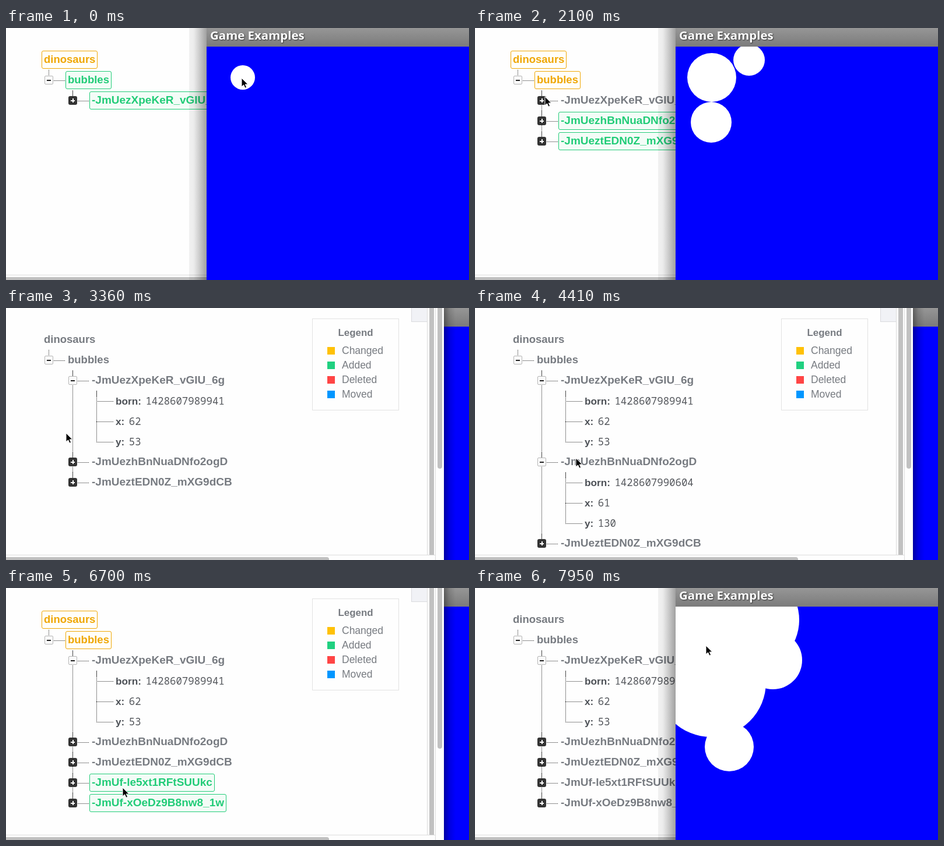
Recreate the animation shown at these times as an HTML page. Size 794 px wide and 433 px high, loop 8 s.

```html
<!DOCTYPE html>
<html lang="en">
<head>
<meta charset="utf-8">
<title>Live data tree and bubbles</title>
<style>
  html, body { margin: 0; width: 100%; height: 100%; overflow: hidden; background: #fefefe; }
  #stage { position: relative; width: 794px; height: 433px; overflow: hidden;
    font-family: "Liberation Sans", Arial, sans-serif; color: #777b81; }
  #stage div, #stage span, #stage svg { position: absolute; box-sizing: border-box; white-space: nowrap; }

  #browser { left: 0; top: 0; width: 751px; height: 433px; background: #fefefe; z-index: 1; }
  #browser .shade { left: 751px; top: 0; width: 20px; height: 433px;
    background: linear-gradient(90deg, rgba(0,0,0,.36), rgba(0,0,0,.13) 45%, transparent); }
  #tree { left: 0; top: 0; width: 722px; height: 424px; overflow: hidden; }
  .thumb { background: #c1c1c1; }
  .rule { background: #dcdcdc; }
  #tab { left: 695px; top: -1px; width: 28px; height: 25px; background: #f1f2f6; border: 1px solid #d9dade; }

  #legend { left: 525px; top: 18px; width: 149px; height: 158px; border: 1px solid #e2e2e2; font-size: 17.5px; }
  #legend b { position: absolute; left: 0; top: 12px; width: 147px; text-align: center;
    font-size: 16.9px; line-height: 23px; }
  #legend i { position: absolute; left: 25px; width: 13px; height: 13px; }
  #legend span { left: 50px; line-height: 24px; }

  #game { left: 344px; top: 0; width: 450px; height: 433px; z-index: 2; }
  #game .shade { left: -30px; top: 0; width: 30px; height: 433px;
    background: linear-gradient(90deg, rgba(0,0,0,.05), rgba(0,0,0,.07) 26%, rgba(0,0,0,.14) 45%, rgba(0,0,0,.37)); }
  #bar { left: 0; top: 0; width: 450px; height: 32px; background: linear-gradient(#969696, #7b7b7b);
    color: #fff; font: bold 20.45px/24px "Open Sans", "Noto Sans", sans-serif; padding-left: 6px;
    text-shadow: 1px 1px 2px #333; }
  #sea { left: 0; top: 32px; width: 450px; height: 401px; background: #00f; overflow: hidden; }
  #sea div { border-radius: 50%; background: #fff; }

  .node { height: 31px; padding: 0 3px; border: 1px solid transparent; border-radius: 3px;
    font-weight: bold; line-height: 28px; font-size: 18.5px; }
  .id { font-size: 19px; }
  .changed { color: #efa705; border-color: #efa705; background: #fffef9; }
  .added { color: #22cc78; border-color: #22cc78; background: #f3fcf7; }
  .key { font-weight: bold; font-size: 17.2px; line-height: 30px; color: #4c5056; }
  .key code { font: 17.35px/30px "Noto Sans Mono", "DejaVu Sans Mono", monospace; margin-left: 7.5px; color: #55585d; }
  .h { height: 1px; background: repeating-linear-gradient(90deg, #222 0 1px, transparent 1px 2px); }
  .v { width: 1px; background: repeating-linear-gradient(#222 0 1px, transparent 1px 2px); }
  .stub { width: 1px; height: 10px; background: #444; }
  .toggle { width: 15px; height: 15px; border-radius: 3px; background: #333; }
  .toggle::before, .toggle::after { content: ""; position: absolute; background: #fff; }
  .toggle::before { left: 4px; top: 6.5px; width: 7px; height: 2px; }
  .toggle::after { left: 6.5px; top: 4px; width: 2px; height: 7px; }
  .open { background: #fafafa; border: 1px solid #b5b5b5; border-radius: 2px; }
  .open::before { left: 3px; top: 5.5px; background: #222; }
  .open::after { display: none; }
  #cursor { left: 0; top: 0; z-index: 3; overflow: visible; }
</style>
</head>
<body>
<div id="stage">
  <div id="browser">
    <div class="shade"></div>
    <div id="tree"></div>
    <div id="tab"></div>
    <div id="legend"><b>Legend</b></div>
    <div class="rule" style="left:722px;top:0;width:1px;height:424px"></div>
    <div class="thumb" style="left:726px;top:0;width:8px;height:424px"></div>
    <div class="rule" style="left:736px;top:0;width:1px;height:433px"></div>
    <div class="rule" style="left:0;top:424px;width:737px;height:1px"></div>
    <div class="thumb" style="left:-5px;top:428px;width:559px;height:8px;border-radius:4px"></div>
    <div class="thumb" style="left:740px;top:-5px;width:8px;height:281px;border-radius:4px"></div>
  </div>
  <div id="game">
    <div class="shade"></div>
    <div id="bar">Game Examples</div>
    <div id="sea"></div>
  </div>
  <svg id="cursor" width="12" height="18">
    <path d="M0 0V15L3.6 11.8L6 17.2L8.6 16.1L6.2 10.9H11Z" fill="#000" stroke="#fff" stroke-width="1"/>
  </svg>
</div>
<script>
const LOOP = 8000, STEP = 210, HOLD = 1980;
const $ = id => document.getElementById(id);

const ticks = Array.from({ length: 39 }, (_, k) => k * STEP - (k > 25 ? 20 : 0) - (k > 34 ? 10 : 0));

const bubbles = [
  { id: "-JmUezXpeKeR_vGIU_6g", born: -60, x: 62, y: 53, stamp: 1428607989941, open: [2730, LOOP] },
  { id: "-JmUezhBnNuaDNfo2ogD", born: 595, x: 61, y: 130, stamp: 1428607990604, open: [3990, 6280] },
  { id: "-JmUeztEDN0Z_mXG9dCB", born: 1370, x: 126, y: 23 },
  { id: "-JmUf-le5xt1RFtSUUkc", born: 4950, x: 167, y: 92 },
  { id: "-JmUf-xOeDz9B8nw8_1w", born: 5750, x: 92, y: 241 }
];

// time, x, y of the pointer tip
const path = [
  [0, 404, 86], [420, 405, 150], [630, 405, 162], [840, 415, 140], [1050, 433, 100],
  [1260, 470, 56], [1470, 371, 73], [1680, 250, 92], [1890, 130, 115], [2310, 110, 121],
  [2940, 110, 124], [3360, 103, 215], [3570, 109, 258], [4200, 111, 262], [4830, 296, 250],
  [5440, 135, 155], [5650, 114, 147], [6070, 109, 260], [6280, 109, 262], [6490, 100, 275],
  [6910, 300, 410], [7120, 400, 450], [7530, 500, 450], [7740, 595, 180], [7950, 396, 99]
];

function pointer(t) {
  const i = Math.max(1, path.findIndex(p => p[0] >= t));
  const [a, b] = [path[i - 1], path[i]];
  const f = (t - a[0]) / (b[0] - a[0]);
  return [a[1] + (b[1] - a[1]) * f, a[2] + (b[2] - a[2]) * f];
}

const box = (cls, x, y, text = "", size = "") =>
  `<div class="${cls}" style="left:${x}px;top:${y}px;${size}">${text}</div>`;
const hline = (x, y, w) => box("h", x, y, "", `width:${w}px`);
const vline = (x, y, end) => box("v", x, y, "", `height:${end - y}px`);
const toggle = (x, y, open) => box(open ? "toggle open" : "toggle", x - 7, y - 7);
const node = (x, y, text, state) => box("node " + state, x - 4, y - 15, text);

function drawTree(t) {
  const live = bubbles.filter(b => b.born <= t);
  const fresh = live.some(b => t < b.born + HOLD);
  const state = fresh ? "changed" : "";
  const top = node(65, 54, "dinosaurs", state) + vline(73, 72, 83) + hline(82, 90, 20) + toggle(73, 89, true)
    + node(106, 89, "bubbles", fresh && live.length === 1 ? "added" : state);
  let y = 124, rows = "", last = y;
  for (const b of live) {
    const open = b.open && t >= b.open[0] && t < b.open[1];
    const added = t < b.born + HOLD;
    rows += box("stub", 114, y - 17) + hline(123, y + 1, 20) + toggle(114, y, open)
      + node(147, y, b.id, added ? "id added" : "id");
    last = y;
    y += 35;
    if (!open) continue;
    rows += vline(155, y - 17, y + 71) + box("stub", 155, y - 17);
    for (const [key, value] of [["born", b.stamp], ["x", b.x], ["y", b.y]]) {
      rows += hline(155, y + 1, 29) + box("key", 188, y - 15, `${key}:<code>${value}</code>`);
      y += 35;
    }
  }
  $("tree").innerHTML = top + vline(114, 107, last) + rows;
}

function drawBubbles(t) {
  $("sea").innerHTML = bubbles.filter(b => b.born <= t).map(b => {
    const r = Math.round(20 + (t - b.born) / 100);
    return box("", b.x - r, b.y - r, "", `width:${2 * r}px;height:${2 * r}px`);
  }).join("");
}

function draw(t) {
  drawTree(t);
  drawBubbles(t);
  $("game").style.zIndex = t >= 2310 && t < 7740 ? 0 : 2;
  const [x, y] = pointer(t);
  $("cursor").style.transform = `translate(${Math.round(x)}px, ${Math.round(y)}px)`;
}

[["Changed", "#ffc107"], ["Added", "#20d080"], ["Deleted", "#ff4545"], ["Moved", "#0096ff"]]
  .forEach(([name, color], i) => {
    const top = 48 + 25 * i;
    $("legend").innerHTML += `<i style="top:${top}px;background:${color}"></i><span style="top:${top - 6}px">${name}</span>`;
  });

const start = performance.now();
let shown = -1;
function frame() {
  const now = (performance.now() - start) % LOOP;
  const t = ticks.findLast(k => k <= now) ?? 0;
  if (t !== shown) draw(shown = t);
  requestAnimationFrame(frame);
}
frame();
</script>
</body>
</html>
```
